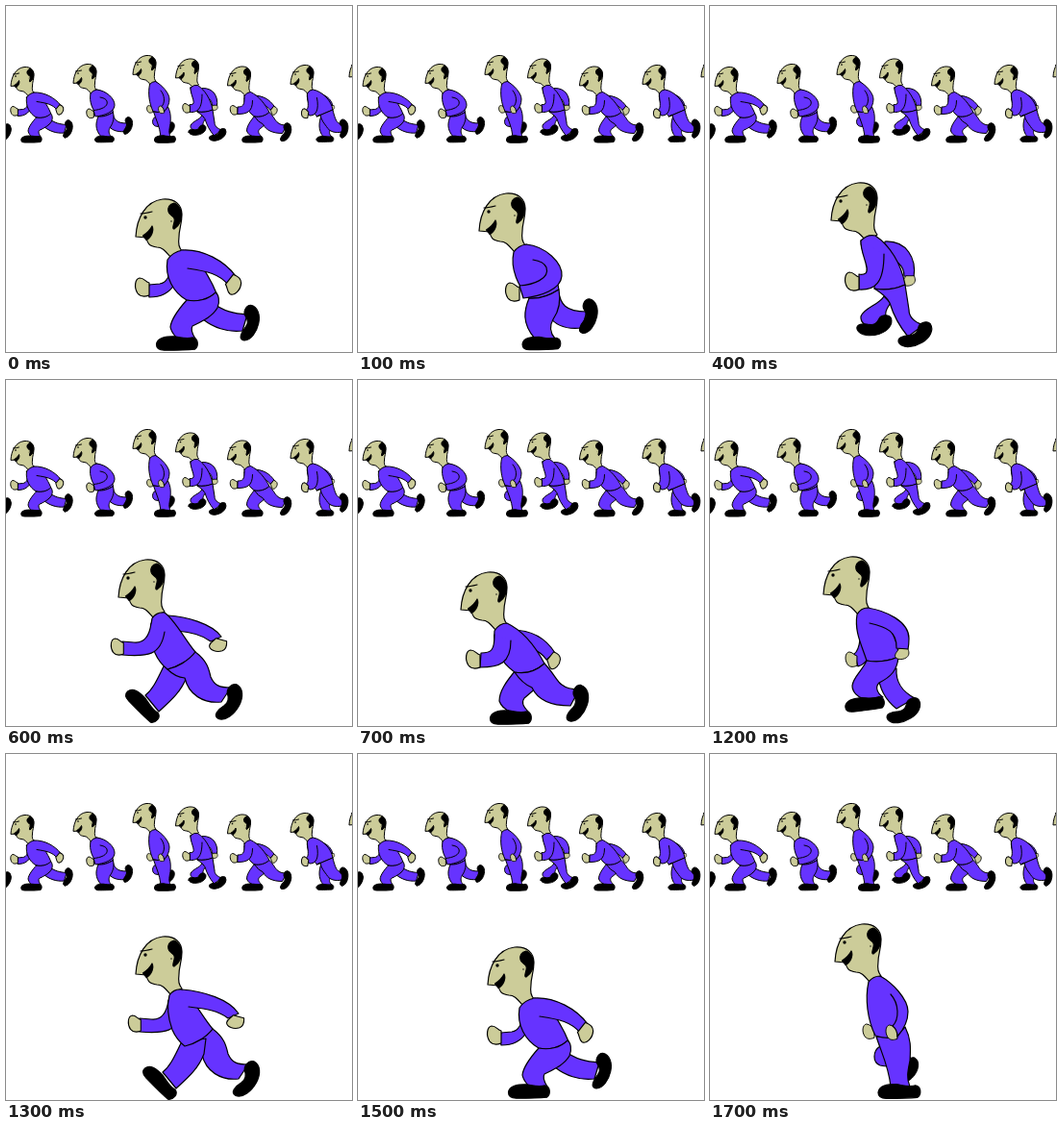
Recreate the animation shown at these times as an HTML page with a canvas. Size 360 px wide and 360 px high, loop 1900 ms.

```html
<!DOCTYPE html>
<html lang="en">
<head>
<meta charset="utf-8">
<title>Run cycle</title>
<style>
html, body { margin: 0; width: 100%; height: 100%; overflow: hidden; background: #fff; }
canvas { display: block; }
</style>
</head>
<body>
<canvas id="stage" width="360" height="360"></canvas>
<script>
const ctx = document.getElementById('stage').getContext('2d');
const SKIN = '#cccc99', BLUE = '#6633ff', INK = '#000';

const SHAPES = {
  skull: 'M0,0 C1,-19 10,-37 28,-39 C41,-40 48,-33 48,-23 C48,-13 45,-8 45,0 C44,8 45,11 48,15 L37,22 C32,17 29,11 22,11 C14,10 12,7 11,1 Z',
  hair: 'M40,-35 C36,-34 33,-31 34,-26 C35,-21 42,-22 40,-15 C39,-11 38,-8 40,-8 C46,-12 48,-19 47.5,-25 C46,-31 43,-34 40,-35 Z',
  mouth: 'M7.5,-1 C12,-4 15,-7 17,-11 C19,-7 17,0 11,3.5 Z',
  brow: 'M5,-24 C9,-24 13,-25 17,-26',
  hand: 'M7,-5 C3,-6 2,-10 -3,-10 C-8,-9 -9,0 -5,6 C-1,11 4,9 7,8 Z',
  flatFoot: 'M-21,2 C-20,-5 -12,-6 -3,-6 C4,-5 10,-3 16,-5 C22,-4 22,4 18,7 C8,8 -8,8 -13,8 C-18,8 -21,6 -21,2 Z',
  bentFoot: 'M-20,-1 C-21,-8 -12,-7 -5,-4 C0,-2 4,-4 7,-8 C10,-12 19,-12 21,-6 C22,2 14,8 4,9 C-6,10 -18,7 -20,-1 Z'
};
for (const key in SHAPES) SHAPES[key] = new Path2D(SHAPES[key]);

function paint(path, fill) {
  if (fill) { ctx.fillStyle = fill; ctx.fill(path); }
  ctx.stroke(path);
}

function placed(x, y, degrees, scale, draw) {
  ctx.save();
  ctx.translate(x, y);
  ctx.rotate(degrees * Math.PI / 180);
  ctx.scale(scale, scale);
  draw();
  ctx.restore();
}

// Part makers: each returns a function that draws the part.
function cloth(data) {
  const path = new Path2D(data);
  return () => paint(path, BLUE);
}
const hand = (x, y, degrees = 0, scale = 1) => () =>
  placed(x, y, degrees, scale, () => paint(SHAPES.hand, SKIN));
const foot = (x, y, degrees = 0, length = 40) => () =>
  placed(x, y, degrees, length / 41, () => paint(SHAPES.flatFoot, INK));
const bentFoot = (x, y, degrees, length = 40) => () =>
  placed(x, y, degrees, length / 41, () => paint(SHAPES.bentFoot, INK));
const head = (x, y) => () => placed(x, y, 0, 1, () => {
  paint(SHAPES.skull, SKIN);
  paint(SHAPES.hair, INK);
  paint(SHAPES.mouth, INK);
  paint(SHAPES.brow);
  ctx.fillStyle = INK;
  ctx.beginPath();
  ctx.arc(10, -20, 1.7, 0, 7);
  ctx.arc(37, -16, 0.7, 0, 7);
  ctx.fill();
});
const shifted = (dx, dy, parts) => [() =>
  placed(dx, dy, 0, 1, () => parts.forEach(part => part()))];

const pushOff = [
  cloth('M172,268 C171,280 168,288 160,289 L149,290 Q147,297 149,303 C160,303 169,300 175,290 Z'),
  hand(142, 293),
  cloth('M214,308 C226,318 238,320 251,321 L246,338 C230,340 215,334 205,326 Z'),
  bentFoot(254, 331, -72, 37),
  head(135, 240),
  cloth('M168,264 C172,258 178,255 184,254 C200,260 208,277 215,290 L219,299 C210,306 198,308 188,306 C174,298 165,282 168,264 Z'),
  cloth('M188,306 C180,315 172,325 171,334 C172,340 176,343 178,346 L197,346 C193,340 192,336 194,333 C204,328 215,323 220,314 C223,307 221,300 218,298 C210,306 198,308 188,306 Z'),
  foot(178, 350, 0, 42),
  cloth('M182,254 C205,252 228,266 239,281 L231,290 C222,279 210,276 189,273'),
  hand(237, 290, 218)
];

const floatBack = [
  cloth('M208,296 C211,310 215,318 238,318 L233,335 C217,337 205,332 198,322 Z'),
  bentFoot(240, 324, -72, 36),
  head(126, 234),
  cloth('M162,256 Q167,249 175,248 C192,252 205,268 209,295 C198,302 186,305 178,304 C167,292 158,274 162,256 Z'),
  cloth('M178,304 C173,316 170,330 184,346 L205,346 C199,339 199,333 203,326 C210,316 211,306 209,295 C198,302 188,305 178,304 Z'),
  foot(191, 350, 0, 39),
  cloth('M175,248 C195,250 213,267 212,281 C211,295 190,302 172,304 L168,291 C182,290 200,284 196,272 C194,267 188,265 182,264'),
  hand(161, 298)
];

const standing = 'M173,294 C178,310 186,325 188,346 L208,346 C204,337 206,329 208,319 C209,305 209,296 203,284 C198,290 188,297 173,294 Z';
const bentLeg = 'M177,304 C169,309 169,321 177,324 C185,326 193,325 202,323 L207,338 L214,320 C207,317 203,309 198,300 Z';
const passingTop = [
  head(130, 216),
  cloth('M165,237 Q170,231 177,231 C188,238 200,255 200,268 C200,280 198,288 194,294 Q184,297 172,293 C164,277 161,255 165,237 Z'),
  hand(189, 290, 0, 0.8),
  cloth('M177,231 C190,238 206,255 206,268 C206,278 202,286 195,294 Q195,287 190,283 C197,276 197,260 188,250')
];
const passing = [
  hand(165, 289, 0, 0.8),
  cloth(bentLeg),
  bentFoot(208, 330, -56, 28),
  cloth(standing),
  foot(197, 350, 0, 43),
  ...passingTop
];
const passingOther = shifted(-12, 5, [
  hand(165, 289, 0, 0.8),
  cloth(standing),
  foot(197, 350, 0, 43),
  cloth(bentLeg),
  bentFoot(208, 330, -56, 28),
  ...passingTop
]);

const reach = [
  cloth('M182,245 C205,244 215,263 212,282 L202,281 C202,270 194,263 180,262 Z'),
  hand(207, 286, -90, 0.7),
  cloth('M181,302 C176,311 160,314 157,323 C156,330 163,333 171,336 L188,328 C181,324 181,318 188,309 Z'),
  bentFoot(171, 334, -12, 37),
  head(126, 223),
  cloth('M157,244 Q164,237 172,239 C187,249 199,268 203,290 C194,294 182,296 171,294 L172,276 C166,268 157,256 157,244 Z'),
  cloth('M171,294 Q184,302 187,309 C191,322 196,332 206,344 L222,332 C213,329 207,324 207,316 L203,290 C194,294 182,296 171,294 Z'),
  bentFoot(214, 344, -25, 38),
  cloth('M157,244 C156,257 167,273 162,278 Q159,280 155,279 L155,295 C172,296 181,288 181,258'),
  hand(148, 287)
];

const strideTorso = 'M152,248 Q157,241 165,242 C176,250 186,270 197,283 C190,292 178,299 168,301 C163,297 158,291 155,284 C151,273 149,260 152,248 Z';
const frontLeg = cloth('M164,298 C158,310 153,322 145,328 L159,345 C170,335 182,325 188,309 L190,293 Z');
const rearLeg = cloth('M168,301 C178,299 190,292 197,283 C209,292 211,300 213,309 C217,318 222,320 234,320 L224,335 C205,337 190,327 186,310 Q176,309 168,301 Z');
const frontFoot = foot(143, 338, 46, 42);
const rearFoot = bentFoot(233, 337, -55, 40);
const rearArm = 'M169,245 C186,246 214,253 224,267 L213,272 C204,265 190,262 178,261';
const frontArm = 'M151,253 C149,268 142,274 133,273 L121,272 Q119,280 121,286 C147,288 161,287 165,262';
const rearHand = hand(221, 276, -75, 0.9);
const frontHand = hand(116, 278, 0, 0.9);
const stride = [
  cloth(rearArm), rearHand, frontLeg, frontFoot,
  head(117, 226), cloth(strideTorso),
  rearLeg, rearFoot, cloth(frontArm), frontHand
];
const strideOther = shifted(18, 3, [
  cloth(frontArm), frontHand, rearLeg, rearFoot,
  head(117, 226), frontLeg, frontFoot, cloth(strideTorso),
  cloth('M165,242 C188,244 214,252 224,267 L213,272 C203,264 190,262 172,260'), rearHand
]);

const pushOffOther = [
  cloth('M160,260 C180,260 195,268 205,284 L196,291 C189,280 177,279 168,278 Z'),
  hand(204, 292, 218, 0.85),
  cloth('M164,302 C154,314 147,324 147,334 C149,340 155,344 160,346 L178,346 C171,339 170,335 173,331 L194,313 Z'),
  foot(159, 350, 0, 42),
  head(107, 239),
  cloth('M142,261 Q147,253 155,253 C172,261 185,278 194,295 C185,303 174,306 163,304 C149,294 140,279 142,261 Z'),
  cloth('M163,304 C174,306 185,303 194,295 C203,304 207,314 212,317 C217,321 222,322 230,322 L221,339 C202,339 187,333 181,320 Q171,316 163,304 Z'),
  bentFoot(229, 338, -66, 39),
  cloth('M142,265 C142,281 139,284 128,284 L127,299 C147,299 159,295 159,271'),
  hand(120, 291)
];

const floatFront = [
  cloth('M165,257 C180,256 194,269 196,282 L186,286 Z'),
  hand(194, 286, -90, 0.6),
  cloth('M172,302 C167,316 165,332 176,346 L194,346 C187,340 188,334 194,327 L196,306 Z'),
  foot(180, 350, 0, 35),
  head(108, 236),
  cloth('M143,256 Q147,248 155,248 C175,252 193,271 196,290 L163,304 C152,291 140,272 143,256 Z'),
  cloth('M163,304 L196,290 C199,302 202,313 207,317 Q211,320 217,319 L215,336 C201,339 189,336 183,325 C178,318 172,312 170,301 Z'),
  bentFoot(219, 330, -82, 38),
  cloth('M143,260 C145,279 146,287 141,290 L147,302 C161,303 168,291 163,265'),
  hand(138, 298, 10)
];

const reachOther = [
  cloth('M156,270 C155,279 153,283 150,285 L154,298 C161,296 164,291 165,286 Z'),
  hand(147, 291, 0, 0.8),
  cloth('M175,306 C176,322 184,334 194,342 L213,331 C200,324 193,315 194,300 Z'),
  bentFoot(202, 346, -26, 38),
  head(118, 223),
  cloth('M153,244 Q157,237 164,237 C184,247 196,270 196,288 C187,292 175,294 163,292 C158,276 150,262 153,244 Z'),
  cloth('M163,292 C158,303 149,309 148,318 C148,325 154,330 160,332 L180,330 C173,325 172,319 176,315 C188,309 195,302 196,288 C187,292 175,294 163,292 Z'),
  foot(161, 336, -6, 40),
  hand(200, 285, -90, 0.75),
  cloth('M164,237 C183,240 207,251 207,269 Q207,275 206,280 L194,279 C195,262 184,257 166,253')
];

const strip = [
  [strideOther, 253], [pushOff, 125], [floatBack, -14], [passing, -134],
  [reach, -227], [pushOffOther, -354], [floatFront, -484], [passingOther, -596]
];

const timeline = [
  [0, pushOff], [100, floatBack], [300, passing], [400, reach],
  [600, stride], [700, pushOffOther], [900, floatFront], [1000, passingOther],
  [1200, reachOther], [1300, strideOther], [1500, pushOff], [1600, floatBack],
  [1700, passing]
];
const LOOP = 1900;

function drawPose(parts, lineWidth) {
  ctx.lineWidth = lineWidth;
  ctx.lineJoin = ctx.lineCap = 'round';
  parts.forEach(part => part());
}

function render() {
  const time = performance.now() % LOOP;
  ctx.fillStyle = '#fff';
  ctx.fillRect(0, 0, 360, 360);
  for (const [pose, offset] of strip) {
    placed(-offset / 2, -37, 0, 0.5, () => drawPose(pose, 2));
  }
  const current = timeline.filter(([start]) => start <= time).pop()[1];
  drawPose(current, 1.2);
  requestAnimationFrame(render);
}
render();
</script>
</body>
</html>
```
